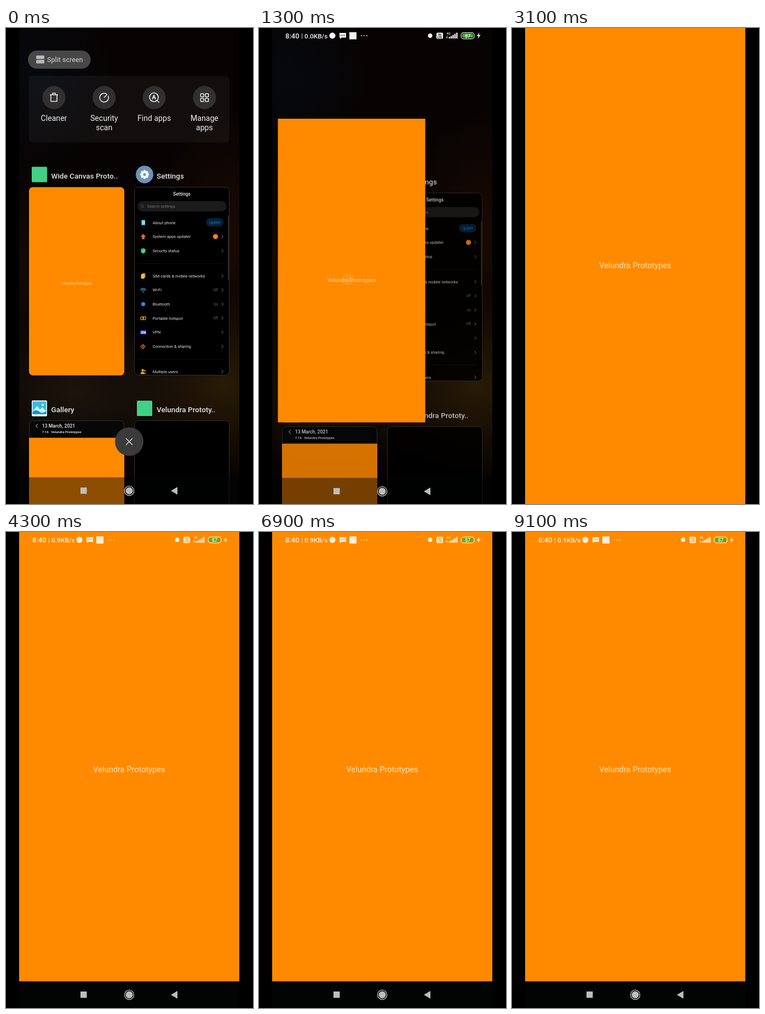
Animation of 451 by 866 pixels, one loop 9.2 s. Source, as an HTML page:

```html
<!DOCTYPE html>
<html lang="en">
<head>
<meta charset="utf-8">
<title>Full screen demo</title>
<style>
html, body { margin: 0; width: 100%; height: 100%; overflow: hidden; background: #000; }
svg { display: block; width: 451px; height: 866px; }
text { font-family: Roboto, sans-serif; white-space: pre; }
#status { --ink: #000; --paper: #f2f2f2; }
</style>
</head>
<body>
<svg id="stage" viewBox="0 0 451 866" xmlns="http://www.w3.org/2000/svg"></svg>
<script>
const ORANGE = '#ff8a00', NAME = 'Velundra Prototypes', LOOP = 9200, STEP = 100;
const stage = document.getElementById('stage');

const text = (x, y, size, fill, str, extra = '') =>
  `<text x="${x}" y="${y}" font-size="${size}" fill="${fill}" ${extra}>${str}</text>`;
const rect = (x, y, w, h, fill, extra = '') =>
  `<rect x="${x}" y="${y}" width="${w}" height="${h}" fill="${fill}" ${extra}/>`;
const circle = (x, y, r, fill, extra = '') =>
  `<circle cx="${x}" cy="${y}" r="${r}" fill="${fill}" ${extra}/>`;
const line = (d, color, width = 1, extra = '') =>
  `<path d="${d}" fill="none" stroke="${color}" stroke-width="${width}" stroke-linecap="round" stroke-linejoin="round" ${extra}/>`;
const shape = (d, fill) => `<path d="${d}" fill="${fill}"/>`;
const at = (x, y, body) => `<g transform="translate(${x} ${y})">${body}</g>`;
const MID = 'text-anchor="middle"', BOLD = 'font-weight="500"', END = 'text-anchor="end"';

function glow(id, x, y, rx, ry, color, alpha) {
  return `<radialGradient id="${id}"><stop offset="0" stop-color="${color}" stop-opacity="${alpha}"/>` +
    `<stop offset="1" stop-color="${color}" stop-opacity="0"/></radialGradient>` +
    `<ellipse cx="${x}" cy="${y}" rx="${rx}" ry="${ry}" fill="url(#${id})"/>`;
}

function backdrop() {
  return rect(0, 0, 451, 866, '#000') + rect(24, 0, 402, 866, '#070303') +
    glow('g1', 50, 90, 150, 170, '#060a10', 0.8) +
    glow('g2', 410, 380, 150, 240, '#1c0a03', 0.9) +
    glow('g3', 400, 650, 210, 170, '#2a1c06', 0.95) +
    glow('g4', 130, 660, 230, 150, '#1d150c', 0.95) +
    glow('g5', 30, 430, 90, 210, '#150b06', 0.9) +
    rect(0, 0, 24, 866, '#000') + rect(426, 0, 25, 866, '#000');
}

function header() {
  const w = '#eee';
  const tools = [
    [87.5, ['Cleaner'], line('M-7-5H7M-5.5-5V7H5.5V-5M-2.5-5V-8H2.5V-5', w, 1.5)],
    [179.2, ['Security', 'scan'], line('M5-6A8 8 0 1 0 7.5-2.5M0 0L5-5', w, 1.5)],
    [270.6, ['Find apps'], circle(-0.5, -0.5, 8, 'none', `stroke="${w}" stroke-width="1.6"`) +
      line('M5.3 5.3L8.8 8.8M-3.6 3L-.5-4.4L2.6 3M-2.4 .8H1.4', w, 1.5)],
    [362.4, ['Manage', 'apps'], [[-7, -7], [1.5, -7], [-7, 1.5], [1.5, 1.5]].map(([x, y]) =>
      rect(x, y, 5.8, 5.8, 'none', `rx="1" stroke="${w}" stroke-width="1.5"`)).join('')]
  ];
  return rect(40, 41, 114.5, 33, '#474747', 'rx="16.5"') +
    rect(55, 50, 15, 6.6, '#b8b8b8', 'rx="1.5"') + rect(55, 58, 15, 6.6, '#b8b8b8', 'rx="1.5"') +
    text(75, 62.2, 12.4, '#b8b8b8', 'Split screen', BOLD) +
    rect(41.5, 87, 366.5, 121, '#fff', 'rx="7" fill-opacity=".045"') +
    tools.map(([x, words, icon]) => circle(x, 126.5, 21, '#323030') + at(x, 126.5, icon) +
      words.map((s, i) => text(x, 169 + i * 16.5, 14.1, '#eee', s, MID)).join('')).join('');
}

const gear = Array.from({ length: 8 }, (_, i) =>
  rect(-2, -8, 4, 5, '#fff', `rx="1" transform="rotate(${i * 45})"`)).join('') +
  circle(0, 0, 6, '#fff') + circle(0, 0, 2.6, '#6d92b5');

const chevron = y => line(`M393.8 ${y - 2.8}l2.8 2.8l-2.8 2.8`, '#8a8a8a', 0.9);

function settings() {
  const wave = r => `M${-r * 0.8} ${3.5 - r * 0.7}A${r} ${r} 0 0 1 ${r * 0.8} ${3.5 - r * 0.7}`;
  const rows = [
    [354, 'About phone', '', rect(-3, -4.5, 6.5, 9, '#7fdcf0', 'rx=".8"')],
    [379.5, 'System apps updater', '', shape('M0-5L5 .2H2.4V4.8H-2.4V.2H-5Z', '#d9694a')],
    [405.5, 'Security status', '', shape('M0-5L4.2-3.2V.5Q4 3.5 0 5Q-4 3.5-4.2.5V-3.2Z', '#35c46a') +
      line('M-1.7 0L-.3 1.4L2-1.2', '#fff', 0.9)],
    [451, 'SIM cards &amp; mobile networks', '', rect(-2.2, -4.8, 6, 8, '#d99a1e', 'rx="1"') +
      rect(-4, -3, 6, 8, '#f3bb3d', 'rx="1"')],
    [476.7, 'Wi-Fi', 'Off', line(wave(6) + wave(3.6), '#36a7e0', 1.3) + circle(0, 3.4, 1.2, '#36a7e0')],
    [502.3, 'Bluetooth', 'On', circle(0, 0, 3.6, '#2f8fe8')],
    [528, 'Portable hotspot', 'Off', circle(-2, 0, 2.9, 'none', 'stroke="#e0a92c" stroke-width="1.3"') +
      circle(2, 0, 2.9, 'none', 'stroke="#e0a92c" stroke-width="1.3"')],
    [553.7, 'VPN', '', rect(-5, -3.5, 10.5, 7, '#3d62e8', 'rx=".8"') +
      text(0.2, 1.8, 4.6, '#fff', 'VPN', MID + ' font-weight="700"')],
    [579.6, 'Connection &amp; sharing', '', line('M-4.5 0L-.5-4L3.5 0L-.5 4ZM-1.5 0L1-2.4M-1.5 0L1 2.4', '#e2683a', 1.2)],
    [625, 'Multiple users', '', circle(-1, -2.3, 2.3, '#f0a52e') + shape('M-5 4.5Q-5 .6-1 .6T3 4.5Z', '#f0a52e') +
      circle(3, -1.5, 1.6, '#d98527') + shape('M3.6 4.5V1Q5.2 1.6 5.2 4.5Z', '#d98527')]
  ];
  return rect(234.5, 289.5, 173, 342, '#000', 'rx="7" stroke="#303030"') +
    text(321, 305.2, 8.7, '#e8e8e8', 'Settings', MID + ' ' + BOLD) +
    rect(240, 315, 162.5, 18.7, '#1b1b1b', 'rx="9.3"') +
    circle(248.7, 323.8, 2.3, 'none', 'stroke="#5c5c5c" stroke-width=".8"') +
    line('M250.5 325.6L252 327.2', '#5c5c5c', 0.8) +
    text(258, 327, 7.4, '#747474', 'Search settings') +
    rect(240, 428, 157, 0.6, '#181818') + rect(240, 602, 157, 0.6, '#181818') +
    rect(405, 341, 2, 118, '#262626', 'rx="1"') +
    rows.map(([y, name, value, icon], i) => at(250.5, y, icon) +
      text(267.7, y + 2.5, 7.4, '#e2e2e2', name) +
      (value ? text(387, y + 2.2, 6.3, '#707070', value, END) : '') +
      (i ? chevron(y) : '')).join('') +
    rect(365, 346, 32, 15, '#04223a', 'rx="7.5"') +
    text(381, 355.8, 6.3, '#1778c8', 'Update', MID) +
    circle(382.5, 379.5, 4.7, '#ec7a12') + text(382.5, 381.6, 5.5, '#ffd9a8', '1', MID);
}

function recents() {
  const label = (x, y, s) => text(x, y, 13.5, '#e4e4e4', s, BOLD);
  const photo = rect(47, 677.5, 28, 29, '#f4f6f7', 'rx="2"') + rect(48.5, 679.5, 25, 23, '#35bce6') +
    circle(67, 685.5, 2, '#fff') + shape('M48.5 697L57 687.5L62 694L66 690L73.5 697V702.5H48.5Z', '#c9f0fa') +
    shape('M48.5 698Q55 693 61 698T73.5 697V702.5H48.5Z', '#1890c8');
  return `<g id="tile">${rect(47, 252.5, 28, 28, '#42d086', 'rx="1.5"')}` +
    `${label(82.5, 273.5, 'Wide Canvas Proto..')}</g>` +
    circle(253, 266.5, 16, '#6d92b5') + at(253, 266.5, gear) + label(275, 273.5, 'Settings') + settings() +
    photo + label(82.5, 699, 'Gallery') +
    rect(239, 678, 28, 28, '#42d086', 'rx="1.5"') + label(275, 699, 'Velundra Prototy..') +
    rect(42.5, 714.5, 173, 200, '#070707', 'rx="7" stroke="#303030"') +
    rect(42, 745.5, 174, 160, ORANGE) +
    line('M57.8 720.7L54.5 724L57.8 727.3', '#ddd', 1) +
    text(65.7, 727.3, 8.7, '#eee', '13 March, 2021', BOLD) +
    text(65.7, 737, 6.1, '#eee', '7:16', BOLD) + text(82.3, 737, 6.1, '#eee', NAME, BOLD) +
    rect(234.5, 714.5, 173, 200, '#000', 'rx="7" stroke="#303030"');
}

function statusBar() {
  const p = 'var(--paper)', ink = 'var(--ink)';
  const bars = [3, 4.5, 6.5, 8.5, 10.5].map((h, i) => rect(346.5 + i * 3.4, 19.5 - h, 2.4, h, p)).join('');
  return text(48, 19, 13, p, '8:40', BOLD) + text(77, 18.5, 11.8, p, '|') +
    `<text id="speed" x="83" y="19" font-size="11.8" font-weight="500" fill="${p}"></text>` +
    circle(134, 14.3, 5.6, p) +
    shape('M147 9.5H159V18H151L148 20.5V18H147Z', p) +
    [150, 153, 156].map(x => circle(x, 13.7, 0.9, ink)).join('') +
    rect(165, 8, 13, 13, p) +
    [187, 192, 197].map(x => circle(x, 14.3, 1, p)).join('') +
    circle(312.5, 14.3, 4, p) +
    rect(324, 8.8, 12, 11.4, p, 'rx="2"') +
    text(330, 14, 5.2, ink, 'Vo', MID + ' font-weight="700"') + text(330, 19, 5, ink, 'LTE', MID + ' font-weight="700"') +
    text(342.5, 12, 5.5, p, '4G', BOLD) + line('M343.5 15V19M341.8 17L343.5 19', p, 0.8) + bars +
    rect(369, 9, 24, 11, 'none', `rx="4.5" stroke="${p}" stroke-width="1.2"`) +
    rect(371, 11, 20, 7, '#43b52c', 'rx="2.5"') + text(381, 18, 9, p, '87', MID + ' ' + BOLD) +
    shape('M402.5 9L397.5 15H400.6L399.5 20L404.6 13.2H401.4Z', p);
}

function navBar() {
  return '<rect id="navBg" x="24" y="817.5" width="402" height="60" fill="#020303"/>' +
    rect(136, 836, 11.5, 11.5, '#bdbdbd') +
    circle(225, 842, 8.6, 'none', 'stroke="#bdbdbd" stroke-width="1.3"') + circle(225, 842, 6.5, '#bdbdbd') +
    shape('M301 842L313 835V849Z', '#bdbdbd');
}

stage.innerHTML = `<g id="overview">${backdrop()}<g id="header">${header()}</g>
  <g id="cards">${recents()}</g></g>
  <g id="app"><rect id="win" fill="${ORANGE}"/>
  <text id="title" text-anchor="middle" fill="#ffe8cc">${NAME}</text></g>
  <circle id="touch" cx="162.5" cy="457" r="11" fill="#fff"/>
  <g id="nav">${navBar()}</g>
  <g id="status">${statusBar()}</g>
  <g id="close">${circle(225, 752.5, 26, '#3b3b3b')}${line('M219.5 747L230.5 758M230.5 747L219.5 758', '#d6d6d6', 1.5)}</g>
  ${rect(0, 0, 24, 866, '#000')}${rect(426, 0, 25, 866, '#000')}`;

const el = {};
stage.querySelectorAll('g[id], rect[id], text[id], circle[id]').forEach(n => { el[n.id] = n; });
const set = (id, attrs) => { for (const k in attrs) el[id].setAttribute(k, attrs[k]); };
const clamp = v => Math.min(1, Math.max(0, v));
const ramp = (t, a, b) => clamp((t - a) / (b - a));
const ease = (t, a, b) => { const x = ramp(t, a, b); return x * x * (3 - 2 * x); };
const mix = (a, b, p) => a + (b - a) * p;

function draw(t) {
  const open = ease(t, 1140, 1500);
  const lift = clamp(open / 0.42);
  const hidden = ease(t, 1280, 1520) * (1 - ease(t, 3820, 4220));
  const leave = 1 - ramp(t, 1050, 1270);
  const onApp = t >= 1400;

  set('overview', { visibility: t < 1600 ? 'visible' : 'hidden' });
  set('header', { opacity: leave });
  set('close', { opacity: leave });
  set('cards', { transform: `translate(0 ${10.7 * lift})`, opacity: 1 - 0.17 * lift });
  set('tile', { opacity: leave });

  // The lower edge trails the upper one slightly.
  const left = mix(42, 24, open), right = mix(216, 426, open), w = right - left;
  const top = mix(289.5, 0, Math.pow(open, 0.965));
  const bottom = mix(632, 866, Math.pow(open, 1.15));
  set('win', { x: left, y: top, width: w, height: bottom - top, rx: 7 * (1 - lift) });
  const size = 14.6 * w / 402;
  set('title', {
    x: left + w / 2, y: 465 - 33 * Math.pow(open, 1.9) + size * 0.35,
    'font-size': size, opacity: mix(0.75, 0.95, open)
  });
  set('touch', { opacity: t >= 1000 && t < 1400 ? 0.08 : 0 });

  set('nav', { transform: `translate(0 ${48 * hidden})`, visibility: hidden < 1 ? 'visible' : 'hidden' });
  set('navBg', { opacity: mix(0.45, 1, ramp(open, 0.42, 1)) });
  set('status', {
    transform: `translate(0 ${-21 * hidden})`, opacity: ramp(t, 1050, 1250),
    visibility: hidden < 1 ? 'visible' : 'hidden'
  });
  el.status.style.setProperty('--ink', onApp ? ORANGE : '#000');
  el.status.style.setProperty('--paper', onApp ? '#ffeed6' : '#f2f2f2');
  el.speed.textContent = t < 3800 ? '0.0KB/s' : t < 8200 ? '0.9KB/s' : '0.1KB/s';
}

const start = performance.now();
function tick() {
  const t = Math.max(0, performance.now() - start) % LOOP;
  draw(Math.floor(t / STEP) * STEP);
  requestAnimationFrame(tick);
}
draw(0);
requestAnimationFrame(tick);
</script>
</body>
</html>
```
